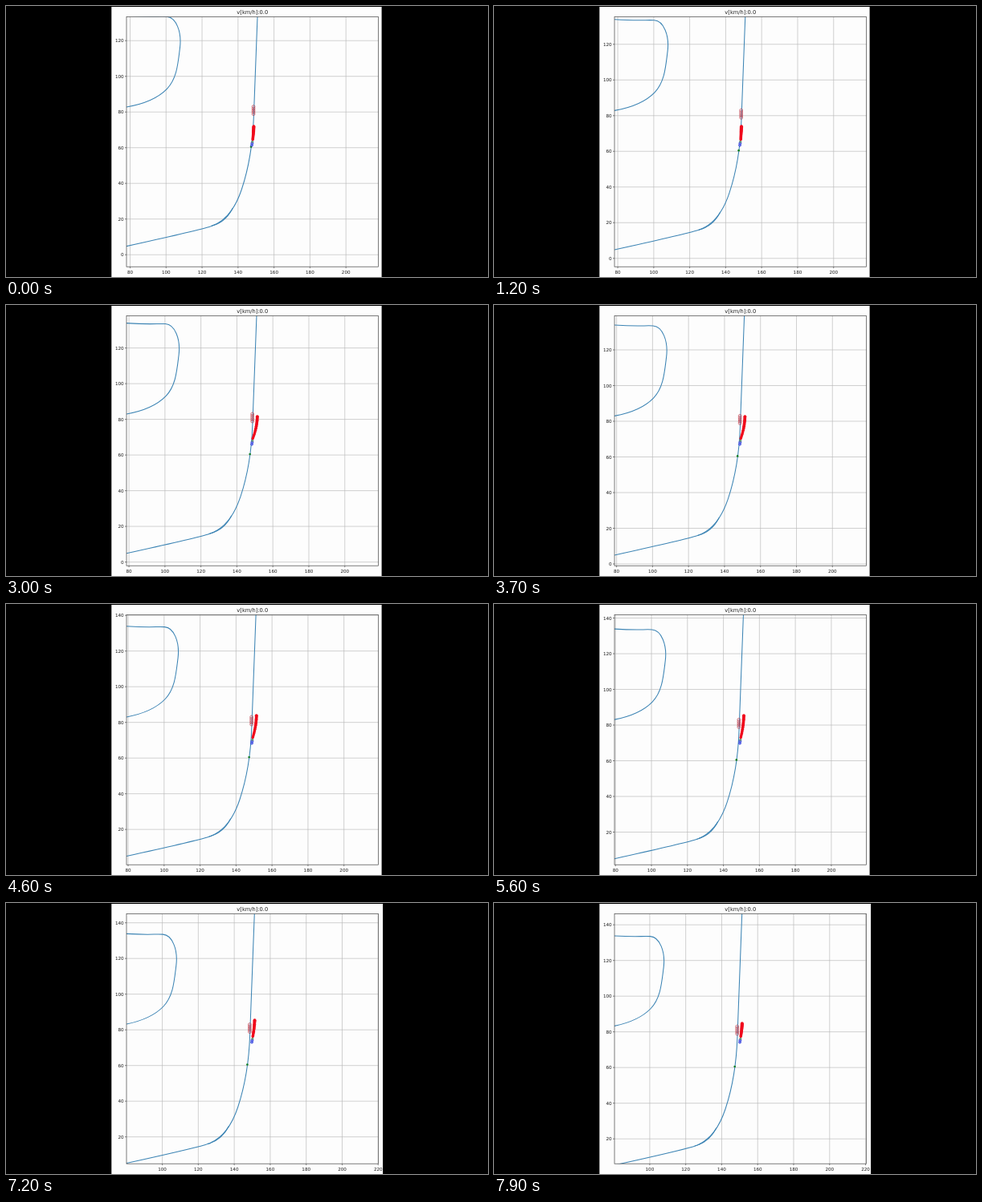
Recreate the animation shown at these times as an HTML page. Size 600 by 338 pixels, loop 8 s.

```html
<!DOCTYPE html>
<html lang="en">
<head>
<meta charset="utf-8">
<title>Path planner plot</title>
<style>
  html, body { margin: 0; height: 100%; overflow: hidden; background: #000; }
  svg { display: block; width: 600px; height: 338px; }
  text { font: 5.6px "DejaVu Sans", sans-serif; fill: #1c1c1c; }
  .title { font-size: 6.7px; text-anchor: middle; }
  .grid { stroke: #b8b8b8; stroke-width: .65; }
  .tick { stroke: #333; stroke-width: .6; }
  .frame { fill: none; stroke: #444; stroke-width: .7; }
  .road { fill: none; stroke: #3c84b4; stroke-width: 1.05; vector-effect: non-scaling-stroke; }
</style>
</head>
<body>
<svg viewBox="0 0 600 338">
  <defs><clipPath id="plot"><rect x="150" y="13.5" width="313.5" height="311.7"/></clipPath></defs>
  <rect width="600" height="338" fill="#000"/>
  <rect id="figure" x="131.3" y="1" width="336.3" height="337" fill="#fdfdfd"/>
  <g id="axes"></g>
  <g clip-path="url(#plot)">
    <g id="roads">
      <path class="road" d="M70 3C90 7.4 115 13 124 15.6S138.5 26 142 36.6S148.2 62 148.7 77S150.6 130 152 165"/>
      <path class="road" d="M125 16Q133 18 137 26"/>
      <path class="road" d="M76 82.5C86 84 95 87.3 100.5 93S106.6 107 107.7 116S105.5 133.2 100.3 133.5S93 132.9 76 134.1"/>
    </g>
    <g id="markers"></g>
  </g>
  <rect class="frame" x="150" y="13.5" width="313.5" height="311.7"/>
  <text class="title" x="306.8" y="10.2">v[km/h]:0.0</text>
</svg>
<script>
const LOOP = 8000, FRAME = 100;
const LEFT = 150, RIGHT = 463.5, TOP = 13.5, BOTTOM = 325.2;
const CENTER_X = 306.75, CENTER_Y = 169.25, SCALE_X = 2.239, SCALE_Y = 2.225;
const HOLDS = [1, 4, 7, 15, 40];

// Vehicle progress: [step, y in plot units]
const PROGRESS = [[0, 63.35], [9, 65.4], [33, 69.1], [51, 71.8], [60, 73.9], [74, 76.15]];
const LAST_STEP = 74;

const byId = id => document.getElementById(id);
const mix = (a, b, u) => a + (b - a) * u;
const clamp = u => Math.min(1, Math.max(0, u));
const smooth = u => u * u * (3 - 2 * u);

function vehicleAt(step) {
  const i = Math.max(1, PROGRESS.findIndex(([s]) => s >= step));
  const [s0, y0] = PROGRESS[i - 1], [s1, y1] = PROGRESS[i];
  return {
    x: 148 + .02 * step + .00017 * step * step,
    y: mix(y0, y1, (step - s0) / (s1 - s0))
  };
}

const line = (cls, x1, y1, x2, y2) =>
  `<line class="${cls}" x1="${x1}" y1="${y1}" x2="${x2}" y2="${y2}"/>`;
const dot = (x, y, r, style) => `<circle cx="${x}" cy="${y}" r="${r}" ${style}/>`;
const label = (x, y, anchor, value) =>
  `<text x="${x}" y="${y}" text-anchor="${anchor}">${value}</text>`;

function drawAxes(toX, toY) {
  let axes = "";
  for (let v = 0; v <= 220; v += 20) {
    const x = toX(v), y = toY(v);
    if (x >= LEFT && x <= RIGHT)
      axes += line("grid", x, TOP, x, BOTTOM) + line("tick", x, BOTTOM, x, BOTTOM + 2)
        + label(x, 333.8, "middle", v);
    if (y >= TOP && y <= BOTTOM)
      axes += line("grid", LEFT, y, RIGHT, y) + line("tick", LEFT - 2, y, LEFT, y)
        + label(146.6, y + 2.1, "end", v);
  }
  byId("axes").innerHTML = axes;
  // The figure grows to hold the outermost label
  byId("figure").setAttribute("width", toX(220) <= RIGHT ? 337.8 : 336.3);
}

// Planned path: straight ahead at first, then bending into the lane beside the obstacle
function trail(step, toX) {
  const swerve = smooth(clamp((step - 9) / 10));
  const length = Math.min(mix(19, 30, swerve), 19 + (LAST_STEP - step) * .57);
  const baseX = 307.2, baseY = 166.5;
  const tipX = toX(mix(148.75, 151.35, swerve)), tipY = CENTER_Y - length;
  const bendX = tipX - .4, bendY = (baseY + tipY) / 2;
  const along = (a, b, c, u) => mix(mix(a, b, u), mix(b, c, u), u);
  let dots = "";
  for (let u = 0; u <= 1; u += 1 / 16)
    dots += dot(along(baseX, bendX, tipX, u), along(baseY, bendY, tipY, u),
      mix(1.7, 2, u), 'fill="#f00a1c"');
  return dots;
}

function draw(step) {
  const vehicle = vehicleAt(step);
  const toX = x => CENTER_X + (x - vehicle.x) * SCALE_X;
  const toY = y => CENTER_Y - (y - vehicle.y) * SCALE_Y;
  drawAxes(toX, toY);
  byId("roads").setAttribute("transform",
    `matrix(${SCALE_X} 0 0 ${-SCALE_Y} ${toX(0)} ${toY(0)})`);

  let markers = dot(toX(147.25), toY(60.5), 1.3, 'fill="#118022"');
  for (let i = 0; i < 5; i++)
    markers += dot(toX(148.6), toY(78.9 + i * 1.02), 1.9,
      'fill="none" stroke="#bb3040" stroke-width=".65"');
  for (let i = 0; i < 2; i++)
    markers += dot(306 + i * .4, 173.6 - i * 2.4, 1.5,
      'fill="#7a86ee" stroke="#2330d8" stroke-width=".7"');
  markers += dot(306.8, 169.2, 1.2, 'fill="#8aa070" stroke="#357a80" stroke-width=".5"');
  byId("markers").innerHTML = markers + trail(step, toX);
}

let shown = -1;
function tick() {
  const frame = Math.floor(performance.now() % LOOP / FRAME);
  if (frame !== shown) {
    shown = frame;
    draw(frame - HOLDS.filter(h => h <= frame).length);
  }
  requestAnimationFrame(tick);
}
tick();
</script>
</body>
</html>
```
